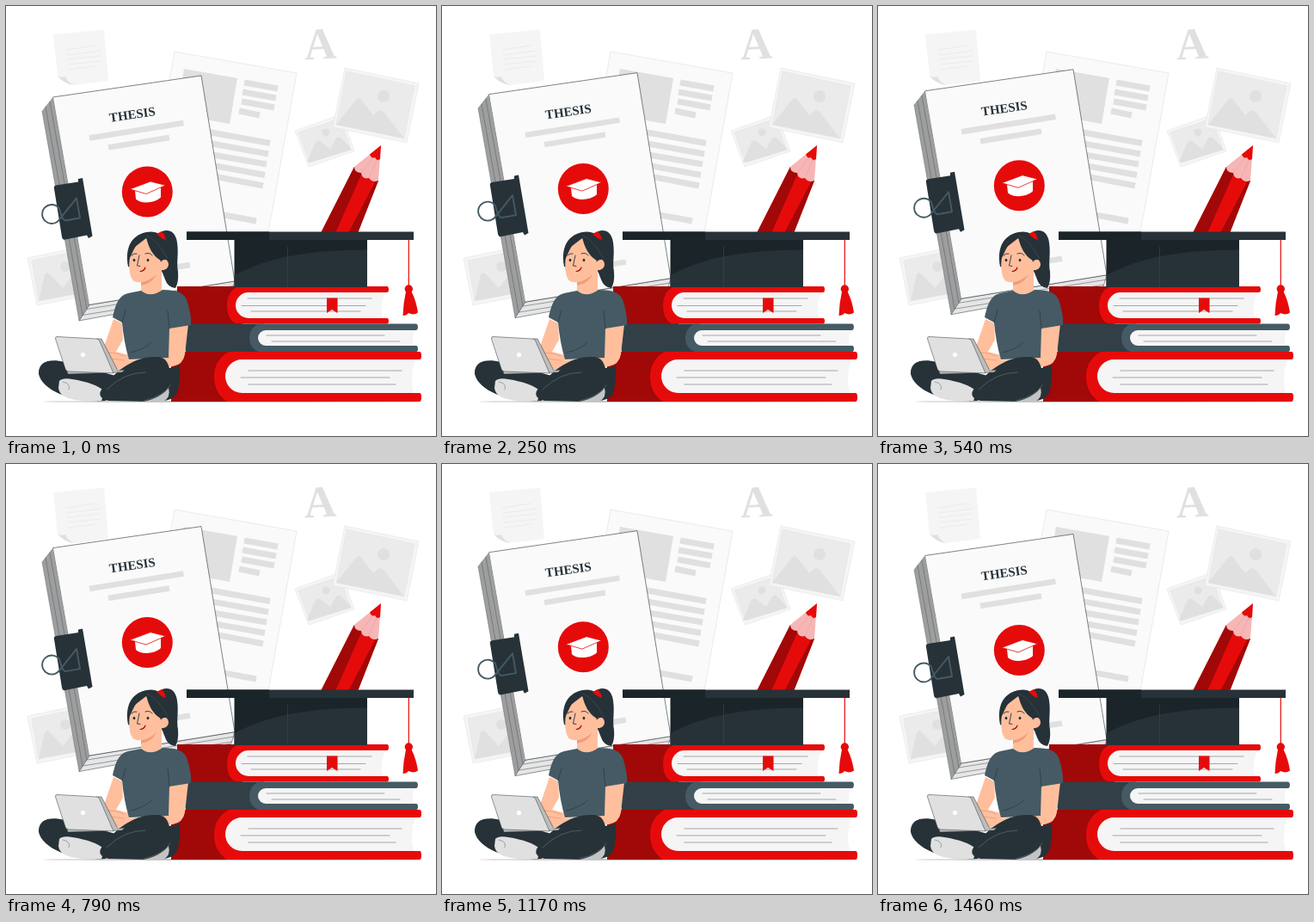
Animation of 500 by 500 pixels, one loop 1.5 s. Source, as an HTML page:

```html
<!DOCTYPE html>
<html lang="en">
<head>
<meta charset="utf-8">
<title>Thesis</title>
<style>
  html, body { margin: 0; width: 100%; height: 100%; overflow: hidden; background: #fff; }
  svg { display: block; width: 100vw; height: 100vh; }
  text { font-family: "Liberation Serif", "Times New Roman", serif; font-weight: bold; }
  .line { fill: none; stroke-linecap: round; stroke-linejoin: round; }
  .red { fill: #e60b0b; } .wine { fill: #a10808; }
  .ink { fill: #263238; } .slate { fill: #455a64; }
  .pale { fill: #f5f5f5; } .grey { fill: #e0e0e0; } .skin { fill: #ffbf9d; }
</style>
</head>
<body>
<svg viewBox="0 0 500 500">
  <!-- background papers -->
  <path class="pale" d="M55 33L114 27.500L119 87L79 92Q66 89 60 81Z"/>
  <path class="grey" d="M60 81Q63 84 69 82Q71 88 79 92Q66 90 60 81Z"/>
  <path class="line" stroke="#e6e6e6" stroke-width=".7" d="M70 51L103 46M71 57L110 52M71 62L110 58M72 68L110 64M72 74L104 70"/>

  <path fill="#fafafa" stroke="#e0e0e0" stroke-width=".6" d="M196 53L338 78L303 275L161 250Z"/>
  <path class="grey" d="M207 73L269 84L260 137L198 126Z"/>
  <path fill="none" stroke="#e0e0e0" stroke-width="7" d="M277 89L316 96M275 100L314 107M274 111L312 118M271 122L295 127
    M200 140L307 159.500M200 153L305 172M200 166L303 184M200 178L301 196.500M200 190L299 209M210 235L291 250"/>

  <text x="366" y="61.500" font-size="52" text-anchor="middle" fill="#e0e0e0" transform="rotate(-3 366 61.500)">A</text>

  <g stroke="#e4e4e4" stroke-width=".6">
    <path class="pale" d="M336 145L390 126L405 169L352 187Z"/>
    <path fill="#ebebeb" d="M340 147L388 131L401 167L353 182Z"/>
    <path class="pale" d="M394 72L480 90L466 159L380 141Z"/>
    <path fill="#ebebeb" d="M396 76L475 93L463 154L384 138Z"/>
    <path class="pale" d="M25 293L88 280L98 336L36 348Z"/>
    <path fill="#ebebeb" d="M30 296L88 284L96 332L38 343Z"/>
  </g>
  <path class="grey" d="M350 181L360 158Q362 155 365 157L377 166L384 154Q387 151 390 154L402 167L353 182Z
    M384 138L407 109Q410 105 413 109L427 127L433 122Q436 120 439 123L463 154Z
    M38 343L45 312Q48 308 52 313L66 328L80 310L96 332Z"/>
  <g class="grey"><circle cx="372" cy="147" r="4.500"/><circle cx="439" cy="105" r="7"/><circle cx="69" cy="303" r="6"/></g>

  <ellipse cx="263" cy="460" rx="220" ry="1" fill="#c4c4c4"/>

  <!-- floating manuscript -->
  <g id="thesis">
    <path fill="#e6e6e6" stroke="#263238" stroke-width=".5" d="M97 348L266 320.500L262 334L85 366.500Z"/>
    <path fill="#9e9e9e" stroke="#455a64" stroke-width=".4" d="M55 106.500L42 123L85 366.500L97 348Z"/>
    <path class="line" stroke="#59666c" stroke-width=".6" d="M51 112L94 353L265 326M46 118L89 360L262 332"/>
    <path fill="#fafafa" d="M55 106.500L227 81.500L266 320.500L97 348Z"/>
    <path class="line" stroke="#263238" stroke-width=".6" d="M55 106.500L227 81.500L266 320.500L97 348"/>
    <text x="147.500" y="131.600" font-size="14.900" text-anchor="middle" class="ink" transform="rotate(-8.300 147.500 131.600)">THESIS</text>
    <path fill="none" stroke="#e0e0e0" stroke-width="6.500" d="M97 154L206.500 136.500M119 165L190 153.500M176 307.500L214 301.500"/>
    <circle class="red" cx="164.300" cy="216.500" r="29.500"/>
    <path fill="#fff" d="M150 215L151 225C157 231 173 230 180 223L180 210Z"/>
    <path fill="#fff" stroke="#e60b0b" stroke-width=".8" d="M144 213.500L168 204.500L185.500 209L163 219Z"/>
    <path class="ink" d="M56 213Q55 210 58 209L84 205V201.500L89 200.500L100.500 268L96 270.500L94 267L69 272Q66 273 65 269Z"/>
    <path class="line" stroke="#455a64" stroke-width="1.900" d="M62 236A11 11 0 1 0 62 249L82 224L86 247L69 250Q65 249 62 236Z"/>
  </g>

  <!-- pencil -->
  <path class="red" d="M405 187L433 203L409 264H366Z"/>
  <path class="wine" d="M405 187L414 194L383 264H366ZM430 203H433L409 264H398Z"/>
  <path fill="#f7b6b6" d="M436 162L405 187Q405 194 413 194Q414 202 422 200Q426 206 433 203Z"/>
  <path class="line" stroke="#e59a9a" stroke-width=".5" d="M427 176L413 194M431 179L422 200"/>
  <path class="red" d="M436 162L423 172.500Q425 178 429 176Q431 181 435 178Z"/>

  <!-- books -->
  <path class="wine" d="M199 326H275V370H199Z"/>
  <path class="red" d="M270 326H443Q445 326 445 329.500T443 333H300V363H443Q445 363 445 366.200T443 369.500H267Q257 364 257 348T270 326Z"/>
  <path class="pale" d="M282 333H441Q434 348 438 363H282A15 15 0 0 1 282 333Z"/>
  <path fill="#323f47" d="M209 369.500H300V402H209Q204 386 209 369.500Z"/>
  <path class="slate" d="M294 369.500H477Q479 370 479 373T477 377H310V395H477Q479 395 479 398.500T477 402H294Q283 398 283 386T294 369.500Z"/>
  <path class="pale" d="M302 377H476Q471 386 474 395H302A9 9 0 0 1 302 377Z"/>
  <path class="wine" d="M192 402H265V460H192Z"/>
  <path class="red" d="M259 402H481Q483 402 483 406.500T481 411H300V450H481Q483 450 483 455T481 460H257Q242 450 242 431T259 402Z"/>
  <path class="pale" d="M274.500 411H476Q469 431 474 450H274.500A19.500 19.500 0 0 1 274.500 411Z"/>
  <path class="line" stroke="#68757b" stroke-width=".6" d="M281 340H425M274 348.500H418M285 355H412M303 383H440M309 390H458
    M282 424H460M273 432H446M282 440H453"/>
  <path class="red" d="M373 339.500H385.500V357L379 353L373 357Z"/>

  <!-- graduation cap -->
  <path fill="#1b2428" d="M265.500 271H420V327H265.500Z"/>
  <path class="ink" d="M265.500 313C306 292 350 284 420 283.500V327H265.500Z"/>
  <path stroke="#37474f" stroke-width=".7" d="M327.500 280V327"/>
  <path class="ink" d="M210 262.400H474V272H210Z"/>
  <path fill="#1b2428" d="M210 262.400H306V272H210Z"/>
  <path class="line" stroke="#e60b0b" stroke-width="1.200" d="M468.300 272V328"/>
  <circle class="red" cx="468.300" cy="329" r="4.700"/>
  <path class="red" d="M465 332Q462 345 461.500 360Q466 360 468 357Q474 360 479 356.500Q477 343 471.500 332Z"/>

  <!-- student -->
  <path class="ink" d="M176 266C184 258 197 259 199 275C201 289 198 297 200 309Q201 321 197 328Q188 327 185 318L178 300Z"/>
  <path class="ink" d="M142 303C137 278 149 263 169 262.500C190 264 195 286 189 302L176 314Z"/>
  <path class="skin" d="M157 312L181 304V334Q171 342 157 333Z"/>
  <path fill="#f29c79" d="M157 320Q169 318 175 312Q170 323 157 325Z"/>
  <path class="skin" d="M146 283C142 296 142 315 149 320C158 324 172 318 178 307C187 309 191 302 188 297C186 293 181 295 180 298L178 288L163 270Z"/>
  <path class="ink" d="M163 268C165 280 171 291 180 296L187 294C190 278 181 264 163 266C149 268 142 278 143 295C148 286 150 275 163 268Z"/>
  <path class="red" d="M175 265L181 262Q185 266 186 272Q181 271 175 265Z"/>
  <path class="line" stroke="#455a64" stroke-width=".5" d="M164 267Q177 273 188 294"/>
  <g class="ink"><ellipse cx="149" cy="295.500" rx="1.400" ry="1.800"/><ellipse cx="165" cy="295.500" rx="1.400" ry="1.800"/></g>
  <path class="line" stroke="#263238" stroke-width=".9" d="M146 290Q149 287 152 288M162 288Q167 286 170 290M155 290L152.500 302L156 302.500"/>
  <path class="line" stroke="#a10808" stroke-width="1.100" d="M156 308.500Q161 308 162 304"/>

  <path class="skin" d="M125 364L135 369L136 388L128 402L143 406V416L131 422L118 418L112 402Z"/>
  <path class="skin" d="M190 372L212 370L208 405Q206 417 194 419L135 424L122 420L140 412L186 409Z"/>
  <path class="line" stroke="#e88c69" stroke-width=".6" d="M119 403Q129 403 138 407M122 410L138 412"/>
  <path class="slate" d="M142 334L157 331Q168 340 182 330C198 330 208 333 211 344Q216 361 215 371L190 375L189 409L143 411Q137 391 135 368L124 362C127 349 130 337 142 334Z"/>
  <path class="line" stroke="#263238" stroke-width=".6" d="M190 375L188 354M135 368L139 354M145 403Q162 399 169 391"/>

  <path class="ink" d="M38 428C37 412 53 410 68 414L135 432L116 459C80 461 43 449 38 428Z"/>
  <path class="grey" d="M62 436Q66 432 77 434Q103 438 115 448L111 459H88Q62 457 61 444Z"/>
  <path class="ink" d="M111 446C125 427 147 407 175 408C186 408 188 415 190 421L202 418Q203 434 200 446C198 458 187 460 165 460L119 459C110 457 107 452 111 446Z"/>
  <path fill="#c4c4c4" d="M160 460Q181 455 189 444Q192 455 183 460Z"/>
  <path class="line" stroke="#68777e" stroke-width=".6" d="M117 446Q137 426 162 426M160 459Q183 454 191 441M66 437Q76 439 73 446"/>

  <path fill="#bdbdbd" stroke="#263238" stroke-width=".5" d="M105 387L111 387L130 424L138 423L135 426L72 428L71 425Z"/>
  <path class="grey" stroke="#263238" stroke-width=".5" d="M60 384.500L105 387Q108 387 109 390L125 427L73 425Q70 425 69 422L57.500 387Q57 384 60 384.500Z"/>
  <circle cx="89.500" cy="405.500" r="2.600" fill="#fff"/>
</svg>
<script>
  const thesis = document.getElementById("thesis");
  const period = 1500, lift = 10, lead = 40;

  function frame() {
    const phase = (performance.now() + lead) % period / period;
    const y = -lift * (1 - Math.abs(1 - 2 * phase));
    thesis.setAttribute("transform", `translate(0 ${y})`);
    requestAnimationFrame(frame);
  }
  frame();
</script>
</body>
</html>
```
